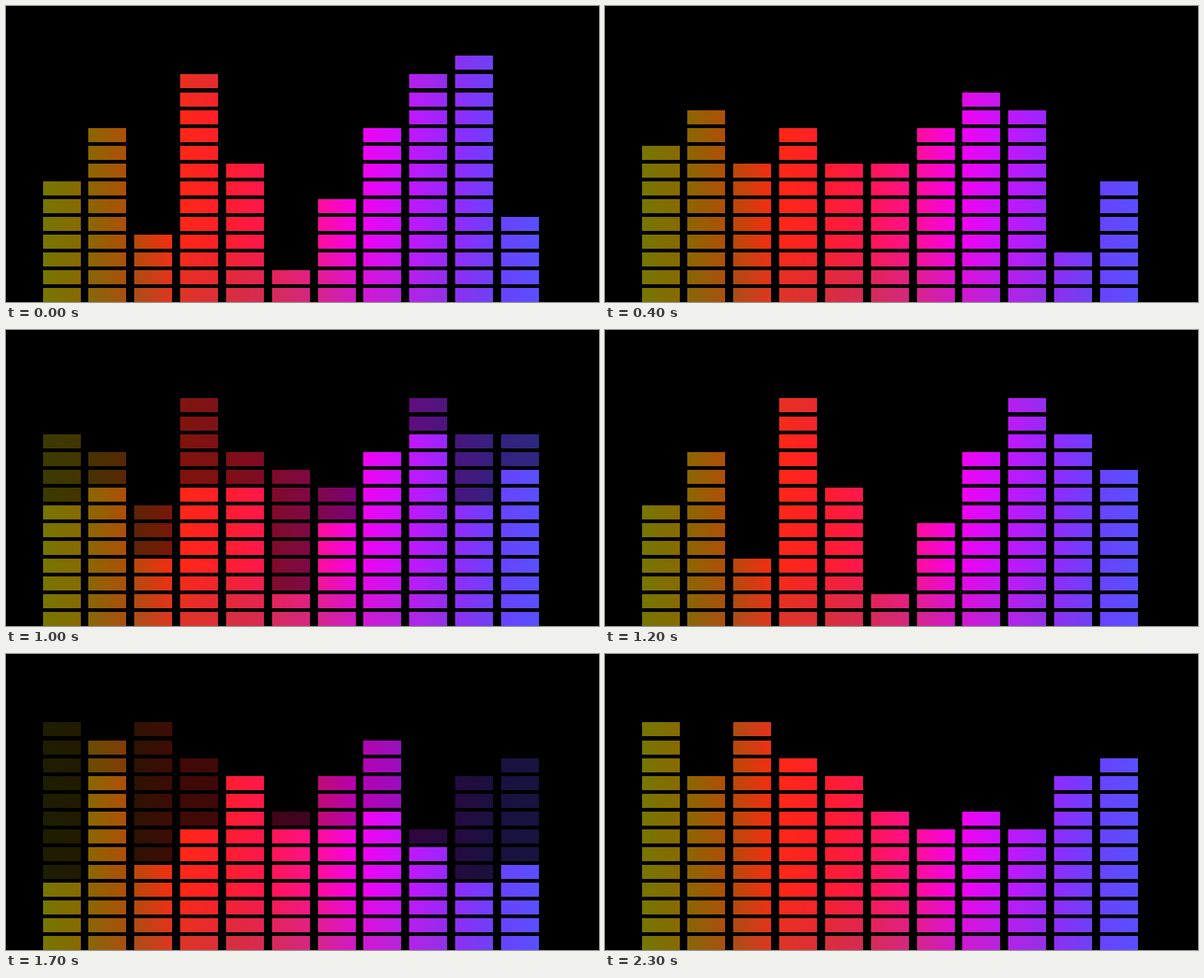
Write an HTML page with a canvas that moves like this. It is 800x400 px and loops after 2.4 s.

```html
<!DOCTYPE html>
<html lang="en">
<head>
<meta charset="utf-8">
<title>Equalizer</title>
<style>
  html, body { margin: 0; width: 100%; height: 100%; overflow: hidden; background: #000; }
  canvas { display: block; }
</style>
</head>
<body>
<canvas id="stage" width="800" height="400"></canvas>
<script>
const ctx = document.getElementById('stage').getContext('2d');
const LOOP = 2400, STEP = 100, FADE = 400;
const BARS = 11, ROWS = 14, LEFT = 50, PITCH = 61.85, BAR_W = 51, CELL_H = 19;

// Lit cells per bar at each key pose; the last pose holds until the loop restarts.
const first = [7, 10, 4, 13, 8, 2, 6, 10, 13, 14, 5];
const poses = [
  first,
  [9, 11, 8, 10, 8, 8, 10, 12, 11, 3, 7],
  [11, 8, 7, 8, 10, 9, 8, 10, 11, 7, 11],
  [...first.slice(0, 9), 11, 9],
  [4, 12, 5, 7, 10, 7, 10, 12, 6, 4, 5],
  [13, 10, 13, 11, 10, 8, 7, 8, 7, 10, 11]
];

// Evenly spaced hues across the whole row of bars.
const hues = '#767600 #8a6700 #b64a08 #ff2814 #ff1e2c #ff1650 #ff1090 #f400f0 #c814ff #9628ff #6c40ff #5850ff'.split(' ');
const rainbow = ctx.createLinearGradient(LEFT, 0, 720, 0);
hues.forEach((hue, i) => rainbow.addColorStop(i / (hues.length - 1), hue));

const barX = bar => Math.floor(LEFT + PITCH * bar);
const rowY = row => 381 - 24 * row - Math.max(0, row - 11);

// Cells grow greyer toward the top and bottom, most in the middle bars.
function greyShare(bar, row) {
  const edge = Math.max(0, Math.abs(row - 6.5) - 3.5);
  return 0.09 * edge * Math.sin(Math.PI * bar / (BARS - 1));
}

function fillCell(bar, row, style, alpha) {
  ctx.globalAlpha = alpha;
  ctx.fillStyle = style;
  ctx.fillRect(barX(bar), rowY(row), BAR_W, CELL_H);
}

function draw(time) {
  const t = Math.floor((time % LOOP) / STEP) * STEP;
  const i = Math.floor(t / FADE);
  const k = (t % FADE) / FADE;
  const from = poses[i], to = poses[Math.min(i + 1, poses.length - 1)];

  ctx.globalAlpha = 1;
  ctx.fillStyle = '#000';
  ctx.fillRect(0, 0, 800, 400);
  for (let bar = 0; bar < BARS; bar++) {
    for (let row = 0; row < ROWS; row++) {
      const light = (row < from[bar]) * (1 - k) + (row < to[bar]) * k;
      if (!light) continue;
      fillCell(bar, row, rainbow, light);
      fillCell(bar, row, '#646464', greyShare(bar, row) * light * light);
    }
  }
}

const start = performance.now();
function tick() {
  draw(performance.now() - start);
  requestAnimationFrame(tick);
}
tick();
</script>
</body>
</html>
```
